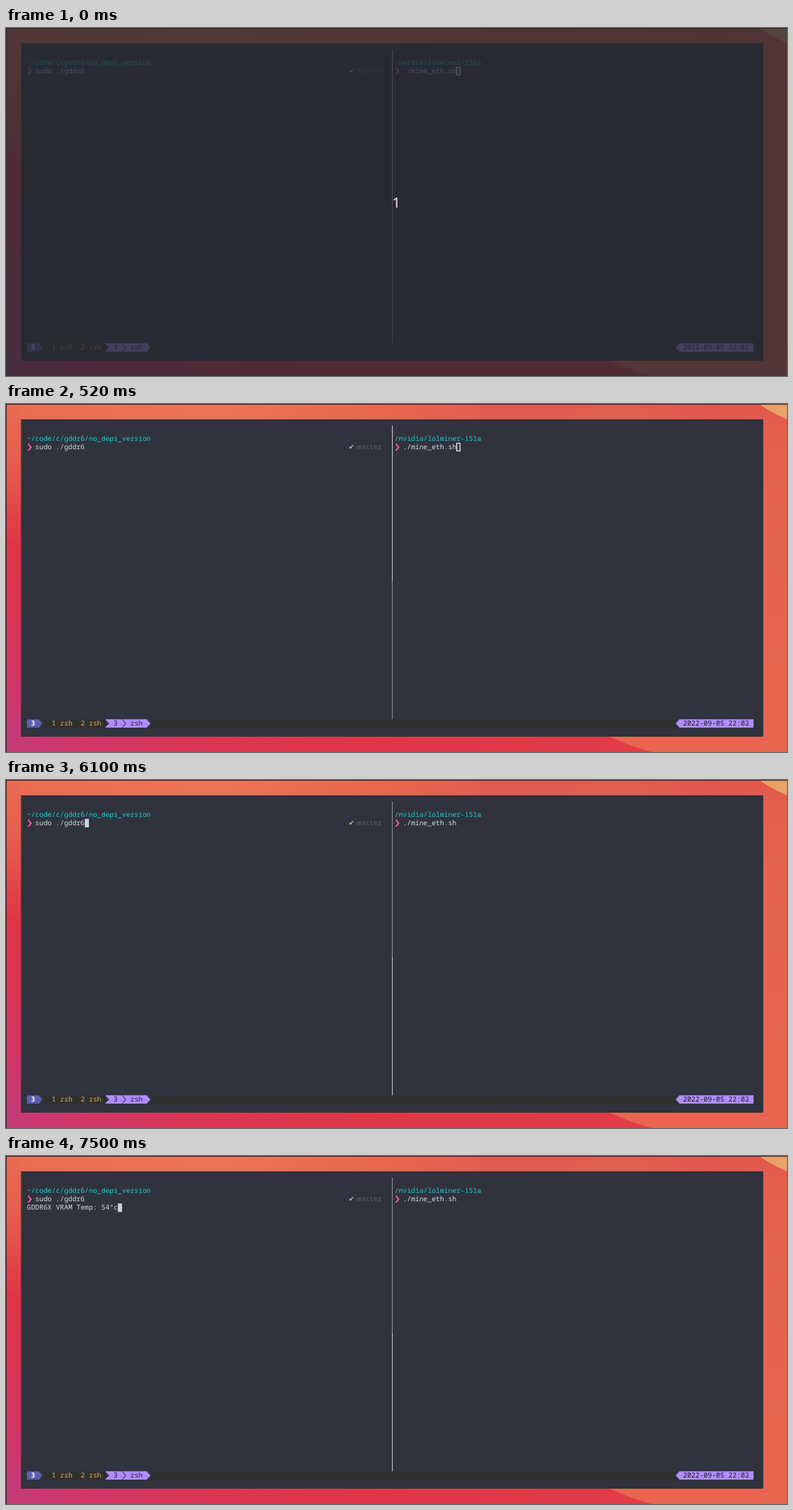
These frames come from a looping animation (1119 by 500 pixels, 8 s). An HTML page:

```html
<!DOCTYPE html>
<html lang="en">
<head>
<meta charset="utf-8">
<title>Terminal session</title>
<style>
  html, body { margin: 0; width: 1119px; height: 500px; overflow: hidden; }
  svg { display: block; }
  body {
    background:
      linear-gradient(#ea6c54, #e65a4c 20%, #e03345 43%, #dc3350 62%, #d03566 84%, #c33a78) 0 0 / 22px 478px no-repeat,
      linear-gradient(90deg, #ea6c54, #ec7458 27%, #e9674f 48%, #e25a50 63%, #e05f50 80%, #e3564c 90%, #e25c4c) 0 0 / 1119px 22px no-repeat,
      linear-gradient(90deg, #c33a78, #cf3668 9%, #dc3450 27%, #e03548 45%, #e23c46 80%) 0 478px / 1119px 22px no-repeat,
      linear-gradient(#e25c4c, #e5634f 25%, #e8654f);
  }
  text { font: 9.87px "Noto Sans Mono", monospace; white-space: pre; text-rendering: geometricPrecision; fill: #d6dae2; }
  .path { fill: #0fd6d8; }
  .tab { fill: #f0a45d; }
  .dark { fill: #1c1a26; }
  .prompt { fill: none; stroke: #ff5fa8; stroke-width: 1.9; }
  .hollow { fill: none; stroke: #f2f4f6; stroke-width: 1.3; }
  .solid { fill: #c8d5e1; }
</style>
</head>
<body>
<svg width="1119" height="500" viewBox="0 0 1119 500">
  <path d="M1079 0H1119V22Q1098 13 1079 0" fill="#e8a468"/>
  <path d="M865 478Q893 491 925 500H1119V478Z" fill="#e8654f"/>
  <path d="M0 .5H1119M.5 0V500" stroke="#3a2024"/>
  <path d="M21.5 22H1085V478H21.5Z" fill="#30323d"/>

  <rect id="upper" x="553" y="31" width="1" height="223.5"/>
  <rect id="lower" x="553" y="254.5" width="1" height="199"/>

  <text class="path" x="30" y="52.5">~/code/c/gddr6/no_deps_version</text>
  <path class="prompt" d="M31.8 57.2L35.8 62L31.8 66.8"/>
  <text x="41.8" y="65">sudo ./gddr6</text>
  <text x="491" y="65" style="font-family:'DejaVu Sans',sans-serif;fill:#c3d08e;font-size:9.5px">✔</text>
  <text x="503" y="65" style="fill:#5d5f66">master</text>
  <text id="output" x="30" y="77.4">GDDR6X VRAM Temp: 54°c</text>

  <text class="path" x="556.7" y="52.5">/nvidia/lolminer-151a</text>
  <path class="prompt" d="M558.5 57.2L562.5 62L558.5 66.8"/>
  <text x="568.5" y="65">./mine_eth.sh</text>
  <rect id="cursor"/>

  <path d="M30 453H1071V465H30Z" fill="#2f302f"/>
  <path d="M30 453H47L52.5 459L47 465H30Z" fill="#5a5fae"/>
  <text x="35.8" y="462.3" style="font-weight:bold;fill:#fff">3</text>
  <text class="tab" x="65.5" y="462.3">1 zsh  2 zsh</text>
  <path d="M142 453H201.5L207 459L201.5 465H142L147.5 459Z" fill="#b08cff"/>
  <text class="dark" x="154" y="462.3">3</text>
  <path d="M166.5 453.3L171.7 459L166.5 464.7" fill="none" stroke="#1c1a26"/>
  <text class="dark" x="178" y="462.3">zsh</text>
  <path d="M1071 453H965L959.5 459L965 465H1071Z" fill="#b08cff"/>
  <text class="dark" x="970" y="462.3">2022-09-05 22:02</text>

  <g id="countdown">
    <path d="M0 0H1119V500H0Z" fill="#262930" opacity=".775"/>
    <text x="559.3" y="258" text-anchor="middle" style="font:20px 'Noto Sans',sans-serif;fill:#f9e6f0">1</text>
  </g>
</svg>
<script>
const LOOP = 8000, SWITCH_PANE = 800, RUN = 6100, OUTPUT = 7500;
const el = id => document.getElementById(id);
const show = (id, on) => el(id).setAttribute('visibility', on ? 'visible' : 'hidden');

function setCursor(x, y, solid) {
  const inset = solid ? 0 : 0.6;
  const box = { x: x + inset, y: y + inset, width: 5.9 - 2 * inset, height: 12.2 - 2 * inset,
                class: solid ? 'solid' : 'hollow' };
  for (const key in box) el('cursor').setAttribute(key, box[key]);
}

function draw(now) {
  const t = now % LOOP;
  const leftActive = t >= SWITCH_PANE;
  show('countdown', t < 100);
  show('output', t >= OUTPUT);
  el('upper').setAttribute('fill', leftActive ? '#90979f' : '#cfd2da');
  el('lower').setAttribute('fill', leftActive ? '#cfd2da' : '#8b8f99');
  if (!leftActive) setCursor(645.2, 55.8, false);
  else if (t < OUTPUT) setCursor(112.9, 55.8, t >= RUN);
  else setCursor(160.3, 68.2, true);
}

const start = performance.now();
function tick() {
  draw(performance.now() - start);
  requestAnimationFrame(tick);
}
tick();
</script>
</body>
</html>
```
